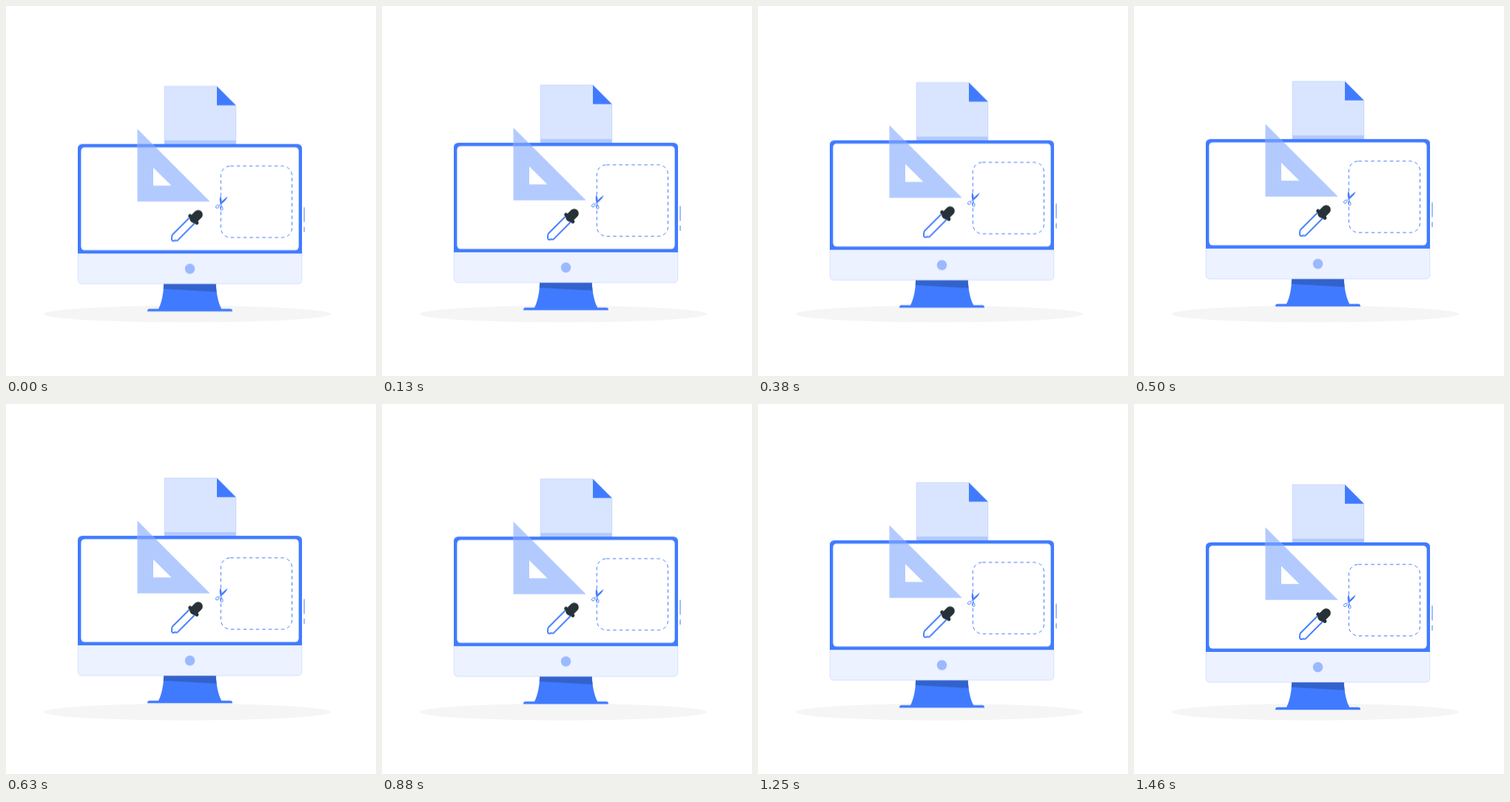
Recreate the animation shown at these times as an HTML page. Size 500 by 500 pixels, loop 1500 ms.

```html
<!DOCTYPE html>
<html lang="en">
<head>
<meta charset="utf-8">
<title>Floating design desk</title>
<style>
  html, body { margin: 0; width: 100%; height: 100%; overflow: hidden; background: #fff; }
  svg { display: block; width: 100vw; height: 100vh; }
  .desk { animation: float 1.5s infinite; }
  .line { fill: none; stroke: #407bff; }
  .blue { fill: #407bff; }
  .pale { fill: #b3caff; }
  .dark { fill: none; stroke: #263238; stroke-linecap: round; }

  /* 24 poses per second */
  @keyframes float {
    0% { transform: translateY(0); animation-timing-function: steps(18, start); }
    50% { transform: translateY(-10px); animation-timing-function: steps(18, start); }
    100% { transform: translateY(0); }
  }
</style>
</head>
<body>
<svg viewBox="0 0 500 500">
  <ellipse cx="244.8" cy="416.2" rx="193.8" ry="11.3" fill="#f5f5f5"/>

  <g class="desk">
    <g id="page">
      <path d="M214.2 109H285l25.7 25.7V188H214.2Z" fill="#d9e5ff" stroke="#b3caff" stroke-width=".6"/>
      <path class="pale" d="M214.2 182h96.5v6h-96.5Z"/>
      <path class="blue" d="M285 109v25.7h25.7Z"/>
    </g>

    <g id="stand">
      <path class="blue" d="M213.2 375H283.5C284.3 389 287 402.500 291.300 409.800H303q3 0 3 3.400H191q0-3.400 3-3.400H206C210.300 402 213 389 213.200 375Z"/>
      <path d="M213.200 375H283.500L284.500 386.800 212.700 382.700Z" fill="#3362cc"/>
    </g>

    <g id="monitor">
      <path d="M97.200 334H399.800V370q0 6-6 6H103.200q-6 0-6-6Z" fill="#ecf2ff" stroke="#b3caff" stroke-width=".5"/>
      <path class="blue" d="M97 335V193.500q0-6.500 6.500-6.500H393.500q6.500 0 6.500 6.500V335Z"/>
      <rect x="101.400" y="191.400" width="294.200" height="139.200" rx="5" fill="#fff"/>
      <circle cx="248.500" cy="355.600" r="6.800" fill="#9bb9ff"/>
      <path class="line" d="M403 272.500v20M403 299v7"/>
    </g>

    <g id="ruler">
      <path class="pale" fill-rule="evenodd" d="M177.500 166.500V264.700H275.700ZM199 219V243.200H223.500Z"/>
      <path d="M177.500 187H198l4.400 4.400H177.500Z" fill="#6a97ff"/>
    </g>

    <g id="dropper">
      <path class="line" style="fill:#fff" stroke-width="1.900" stroke-linejoin="round"
        d="M247.500 287 225 309.500Q224 310.700 224.200 312.300L223.900 315.500Q224.200 318 226.200 318L228.300 317.300 231.500 317.600 255 294"/>
      <path class="dark" stroke-width="5" d="M248.700 284.200 257.900 293.400"/>
      <path class="dark" stroke-width="12.200" d="M254.300 287.800 259.700 282.400"/>
    </g>

    <g id="cutout">
      <rect class="line" x="290.300" y="216.800" width="96.200" height="96.500" rx="13" stroke-dasharray="4.500 4"/>
      <path class="blue" d="M299.600 257.800Q297.800 263.500 290.600 268.400L289.200 267.200Q293.500 262 299.600 257.800ZM290 257Q292.300 262.500 291.300 268.600L289.700 267.800Q287.500 262 290 257Z"/>
      <g class="line" stroke-width=".9">
        <path d="M290 267.500 287.500 270M290.700 268 291 271.500"/>
        <ellipse cx="285.700" cy="271.600" rx="2.500" ry="1.800" transform="rotate(-38 285.700 271.600)"/>
        <ellipse cx="291.300" cy="274" rx="1.700" ry="2.500" transform="rotate(-8 291.300 274)"/>
      </g>
    </g>
  </g>
</svg>
</body>
</html>
```
